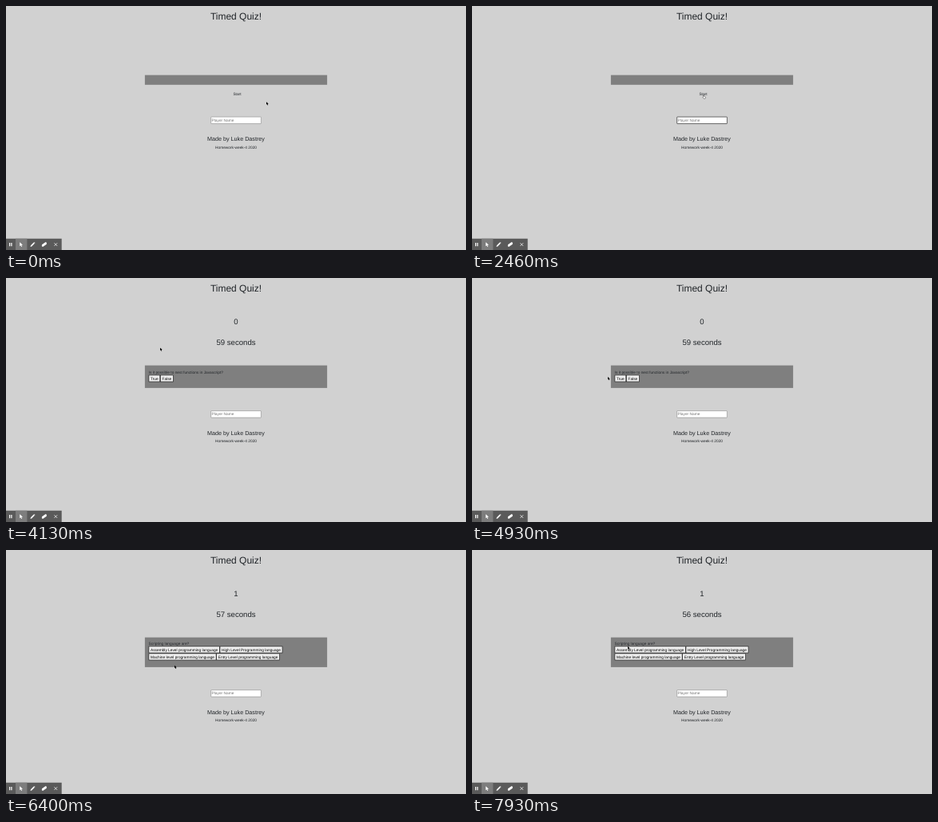
Animation of 576x306 px, one loop 8 s. Source, as an HTML page:

```html
<!DOCTYPE html>
<html lang="en">
<head>
<meta charset="utf-8">
<title>Timed Quiz</title>
<style>
  html, body { margin: 0; width: 100%; height: 100%; overflow: hidden; background: #d1d1d1; }
  svg { display: block; width: 576px; height: 306px; }
  text { font: 4.8px "Liberation Sans", Arial, sans-serif; fill: #212529; text-rendering: geometricPrecision; white-space: pre; }
  .mid { text-anchor: middle; }
  .h1 { font-size: 12px; }
  .h2 { font-size: 9.6px; }
  .h4 { font-size: 7.2px; }
  .hint { fill: #757575; }
  .label { fill: #000; }
  .button { fill: #efefef; stroke: #111; stroke-width: .6; }
</style>
</head>
<body>
<svg viewBox="0 0 576 306">
  <rect width="576" height="306" fill="#d1d1d1"/>
  <text class="mid h1" x="288" y="17.2">Timed Quiz!</text>
  <text class="mid h2" id="score" x="288" y="58.2"></text>
  <text class="mid h2" id="timer" x="288" y="83.9"></text>
  <rect id="panel" x="173.9" width="228.2" fill="#7f7f7f"/>
  <text id="start" x="284.4" y="111.9">Start</text>
  <g id="first"></g>
  <g id="second"></g>

  <g id="footer">
    <rect id="field" x="256.7" y="139.1" width="62.7" height="8.5" rx=".5" fill="#fff" stroke-width=".6"/>
    <text class="hint" x="257.6" y="144.8">Player Name</text>
    <path id="caret" d="M257.8 140.9v5.2" stroke="#000" stroke-width=".4"/>
    <text class="mid h4" x="288" y="169.4">Made by Luke Dastrey</text>
    <text class="mid" x="288" y="178.6">Homework-week-4 2020</text>
  </g>

  <g id="toolbar">
    <path d="M0 291.7h69.7V306H0z" fill="#5a5a5a"/>
    <path d="M12 291.7h14.4V306H12z" fill="#7d7d7d"/>
    <g fill="#fff">
      <path d="M4 297h1.2v4.2H4zM6.3 297h1.2v4.2H6.3z"/>
      <path d="M17.2 296.2v5l1.2-1 .9 1.9.9-.4-.9-1.9h1.7z"/>
      <path d="M30.5 302l.5-1.7 3.7-3.7 1.2 1.2-3.7 3.7zM35 296.3l.5-.4 1 1-.4.5z"/>
      <path d="M45 299.2l4.7-3.1 1.1.7v2l-4.7 3.3-1.3-.8z"/>
    </g>
    <path d="M60.4 297.2l3.8 3.8M64.2 297.2l-3.8 3.8" stroke="#fff" stroke-width=".7"/>
  </g>

  <circle id="ring" r="8" fill="none" stroke="#b91f29" stroke-width="1.3"/>
  <g id="pointer">
    <path id="arrow" d="M0 0v3.5l.8-.7.7 1.4.7-.35-.65-1.35h1.2z"/>
    <path id="hand" d="M-.3.3q.4-.6.8 0v1.4l1.7.4q.5.2.4.8l-.4 1.6H.3L-1 2.9q0-.6.7-.3z" fill="#fff" stroke="#000" stroke-width=".35"/>
    <g id="beam" fill="none">
      <path d="M0-2.3v4.6" stroke="#fff" stroke-width="1"/>
      <path d="M-.6-2.3H.6M0-2.3v4.6M-.6 2.3H.6" stroke="#555" stroke-width=".3"/>
    </g>
  </g>
</svg>
<script>
const LOOP = 8000;
const FOCUS = 1400, BEGIN = 3060, ANSWER = 5930, CLICK_MS = 65;
const LEFT = 178.6, ROW = 9, TIMER_LINE = 11.5;
const $ = id => document.getElementById(id);
const show = (id, on) => $(id).setAttribute("visibility", on ? "inherit" : "hidden");
const move = (id, x, y) => $(id).setAttribute("transform", `translate(${x} ${y})`);

function add(parent, tag, attrs, text) {
  const node = document.createElementNS("http://www.w3.org/2000/svg", tag);
  for (const key in attrs) node.setAttribute(key, attrs[key]);
  if (text) node.textContent = text;
  parent.append(node);
  return node;
}

// Draws a question with rows of buttons sized by their labels.
function question(id, text, baseline, rows) {
  const group = $(id);
  add(group, "text", { x: LEFT, y: baseline }, text);
  rows.forEach((row, i) => {
    let x = LEFT;
    const y = baseline + 2.1 + i * ROW;
    for (const name of row) {
      const box = add(group, "rect", { class: "button", x: x + .3, y: y + .3, height: 8.1 });
      const label = add(group, "text", { class: "label", x: x + 2.4, y: y + 6 }, name);
      const width = label.getComputedTextLength() + 4.8;
      box.setAttribute("width", width - .6);
      x += width;
    }
  });
}

question("first", "Is it possible to nest functions in Javascript?", 108, [["True", "False"]]);
question("second", "Scripting language are?", 118.5, [
  ["Assembly Level programming language", "High Level Programming language"],
  ["Machine level programming language", "Entry Level programming language"]
]);

// Pointer moves, each resting until the next one starts
const home = { x: 326, y: 120.3 };
const moves = [
  { from: 730, to: 1200, x: 274.4, y: 142.4 },
  { from: 2000, to: 2460, x: 289.9, y: 111.6 },
  { from: 3660, to: 4130, x: 193, y: 87.5 },
  { from: 4130, to: 4900, x: 170, y: 124 },
  { from: 4900, to: 5800, x: 190.8, y: 125 },
  { from: 6260, to: 6400, x: 211, y: 144.8 },
  { from: 6400, to: 7930, x: 195, y: 120.8 }
];

const clamp = k => Math.min(1, Math.max(0, k));
const ease = k => k * k * (3 - 2 * k);

function pointerAt(t) {
  let { x, y } = home;
  for (const m of moves) {
    const k = ease(clamp((t - m.from) / (m.to - m.from)));
    x += (m.x - x) * k;
    y += (m.y - y) * k;
  }
  return [x, y];
}

function draw(t) {
  const asked = t >= BEGIN, answered = t >= ANSWER;
  const seconds = Math.floor((t - BEGIN) / 1000);
  const ticking = seconds >= 1;
  const rows = answered ? 2 : asked ? 1 : 0;
  const shift = ticking ? TIMER_LINE : 0;
  const drop = (asked ? 7 + rows * ROW : 0) + shift;

  $("score").textContent = asked ? (answered ? "1" : "0") : "";
  $("timer").textContent = ticking ? `${60 - seconds} seconds` : "";
  $("panel").setAttribute("y", 86.6 + (asked ? TIMER_LINE : 0) + shift);
  $("panel").setAttribute("height", asked ? 19.3 + rows * ROW : 12.2);
  show("start", !asked);
  show("first", asked && !answered);
  show("second", answered);
  move("first", 0, shift);
  move("footer", 0, drop);

  const [x, y] = pointerAt(t);
  const inside = (x0, y0, x1, y1) => x >= x0 && x <= x1 && y >= y0 && y <= y1;
  const beam = inside(256.7, 139 + drop, 319.5, 148 + drop);
  const hand = inside(282, 107, 297, 114) || rows === 1 && inside(LEFT, 121.7, 209.5, 130.5);
  move("pointer", x, y);
  show("beam", beam);
  show("hand", hand && !beam);
  show("arrow", !hand && !beam);

  const focused = t >= FOCUS && !asked;
  const blink = t - FOCUS - 60;
  $("field").setAttribute("stroke", focused ? "#101010" : beam ? "#555" : "#888");
  show("caret", focused && blink >= 0 && Math.floor(blink / 540) % 2 === 0);

  show("ring", [FOCUS, BEGIN, ANSWER].some(c => t >= c && t < c + CLICK_MS));
  move("ring", x, y);
}

const began = performance.now();
function tick() {
  draw((performance.now() - began) % LOOP);
  requestAnimationFrame(tick);
}
tick();
</script>
</body>
</html>
```
